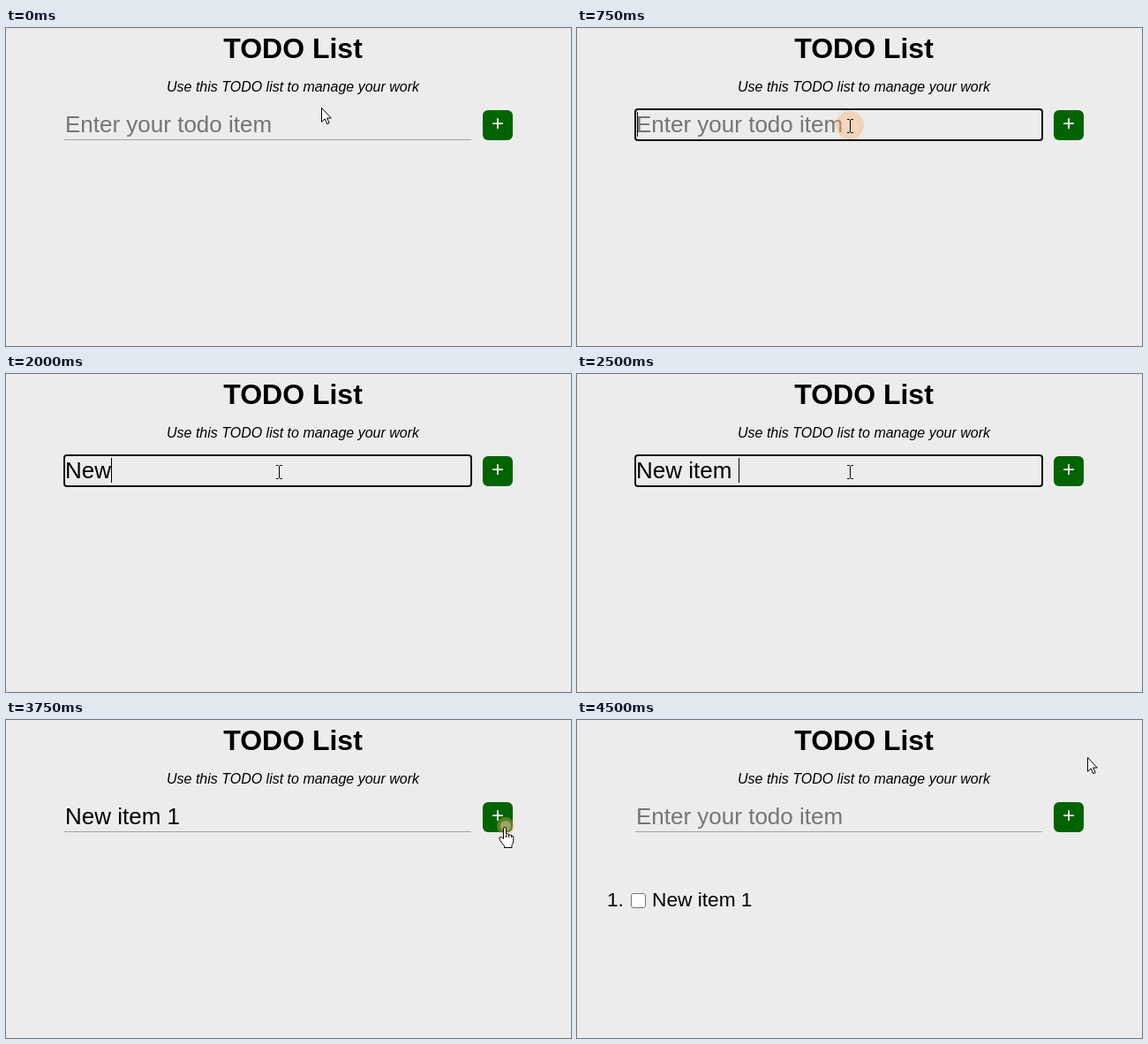
An HTML page with a canvas that plays this animation: 640x360 px, repeating every 4.75 s.

```html
<!DOCTYPE html>
<html lang="en">
<head>
<meta charset="utf-8">
<title>TODO List</title>
<style>
html, body { margin: 0; width: 100%; height: 100%; overflow: hidden; background: #ececec; }
canvas { display: block; }
</style>
</head>
<body>
<canvas id="stage" width="640" height="360"></canvas>
<script>
const ctx = document.getElementById('stage').getContext('2d');
const LOOP = 4750, STEP = 250;
const FAMILY = '"Liberation Sans", Arial, sans-serif';
const FIELD_FONT = '26px ' + FAMILY;
const LIST_FONT = '22.7px ' + FAMILY;

// Each cue holds until the next one: [ms, ...values]
const pointer = [
  [0, 'arrow', 357, 90], [250, 'beam', 330, 107], [500, 'beam', 309, 111],
  [3250, 'arrow', 505, 142], [3500, 'hand', 565, 121], [4000, 'hand', 567, 119],
  [4250, 'hand', 567, 111], [4500, 'arrow', 578, 42]
];
const typed = [
  [0, ''], [1750, 'N'], [2000, 'New'], [2250, 'New it'],
  [2500, 'New item '], [3000, 'New item 1'], [4000, '']
];
const caret = [[0, false], [750, true], [1250, false], [1750, true], [3250, false]];
const clicks = [
  { start: 750, x: 309, y: 110, r: 16 },
  { start: 3750, x: 566, y: 120, r: 10 }
];

const cue = (list, t) => list.filter(c => c[0] <= t).pop();

function label(str, x, y, font, color = '#000', align = 'left') {
  ctx.font = font;
  ctx.fillStyle = color;
  ctx.textAlign = align;
  ctx.fillText(str, x, y);
}

function box(x, y, w, h, r, fill, stroke, line = 1) {
  ctx.beginPath();
  ctx.roundRect(x, y, w, h, r);
  if (fill) { ctx.fillStyle = fill; ctx.fill(); }
  if (stroke) { ctx.strokeStyle = stroke; ctx.lineWidth = line; ctx.stroke(); }
}

function disc(x, y, r, color) {
  ctx.fillStyle = color;
  ctx.beginPath();
  ctx.arc(x, y, r, 0, Math.PI * 2);
  ctx.fill();
}

const shapes = {
  arrow: new Path2D('M.5 .5V16.3L4.2 12.9L6.8 18.7L9.2 17.6L6.7 12H11.3Z'),
  hand: new Path2D('M-1.5 13.5V2Q-1.5 .5 0 .5T1.5 2V8Q4 7 4.6 9Q7 8.2 7.6 10.2' +
    'Q10 9.8 9.8 12.5V16Q9.6 18.5 8 20.5V23.5H-.5V21.5Q-3.5 18.5-5 15.5' +
    'Q-7.2 12.4-5.5 11.6T-1.5 13.5Z'),
  beam: new Path2D('M-3 -7.5H-.5L.5 -6.5L1.5 -7.5H4M.5 -6.5V6.5M-3 7.5H-.5L.5 6.5L1.5 7.5H4')
};

function drawPointer([, kind, x, y]) {
  ctx.save();
  ctx.translate(x, y);
  ctx.lineWidth = 1;
  ctx.lineJoin = 'round';
  ctx.strokeStyle = '#000';
  if (kind !== 'beam') {
    ctx.fillStyle = '#fff';
    ctx.fill(shapes[kind]);
  }
  ctx.stroke(shapes[kind]);
  if (kind === 'hand') {
    ctx.beginPath();
    for (const fx of [1.5, 4.6, 7.6]) {
      ctx.moveTo(fx, 9);
      ctx.lineTo(fx, 12);
    }
    ctx.stroke();
  }
  ctx.restore();
}

// A soft disc on press, then one wider fading ring
function drawClick({ start, x, y, r }, t) {
  const age = t - start;
  if (age < 0 || age >= 2 * STEP) return;
  if (age < STEP) {
    disc(x, y, r, 'rgba(250,170,95,.38)');
    disc(x, y, r * 0.6, 'rgba(245,225,205,.4)');
  } else {
    ctx.beginPath();
    ctx.arc(x, y, r + 9.5, 0, Math.PI * 2);
    ctx.strokeStyle = 'rgba(245,180,110,.5)';
    ctx.lineWidth = 3;
    ctx.stroke();
  }
}

function drawField(t) {
  const text = cue(typed, t)[1];
  if (t >= 750 && t < 3750) {
    box(66, 92, 461, 35, 3, null, '#101010', 2);
  } else {
    ctx.fillStyle = '#a2a2a2';
    ctx.fillRect(66, 126, 461, 1);
  }
  label(text || 'Enter your todo item', 67, 118, FIELD_FONT, text ? '#000' : '#757575');
  if (cue(caret, t)[1]) {
    ctx.fillStyle = '#000';
    ctx.fillRect(Math.round(67.4 + (text ? ctx.measureText(text).width : 0.6)), 95, 1, 28);
  }
}

function drawList() {
  label('1.', 34, 211, LIST_FONT);
  box(61.5, 196.5, 16, 16, 2.5, '#fff', '#767676');
  label('New item 1', 85, 211, LIST_FONT);
}

function draw(t) {
  ctx.fillStyle = '#ececec';
  ctx.fillRect(0, 0, 640, 360);
  label('TODO List', 325, 34, 'bold 32px ' + FAMILY, '#000', 'center');
  label('Use this TODO list to manage your work', 325, 72, 'italic 16px ' + FAMILY, '#000', 'center');
  drawField(t);
  box(540, 93, 34, 34, 6, '#006400');
  label('+', 557, 116, '24px ' + FAMILY, '#fff', 'center');
  if (t >= 4000) drawList();
  clicks.forEach(c => drawClick(c, t));
  drawPointer(cue(pointer, t));
}

function tick() {
  draw(performance.now() % LOOP);
  requestAnimationFrame(tick);
}
tick();
</script>
</body>
</html>
```
